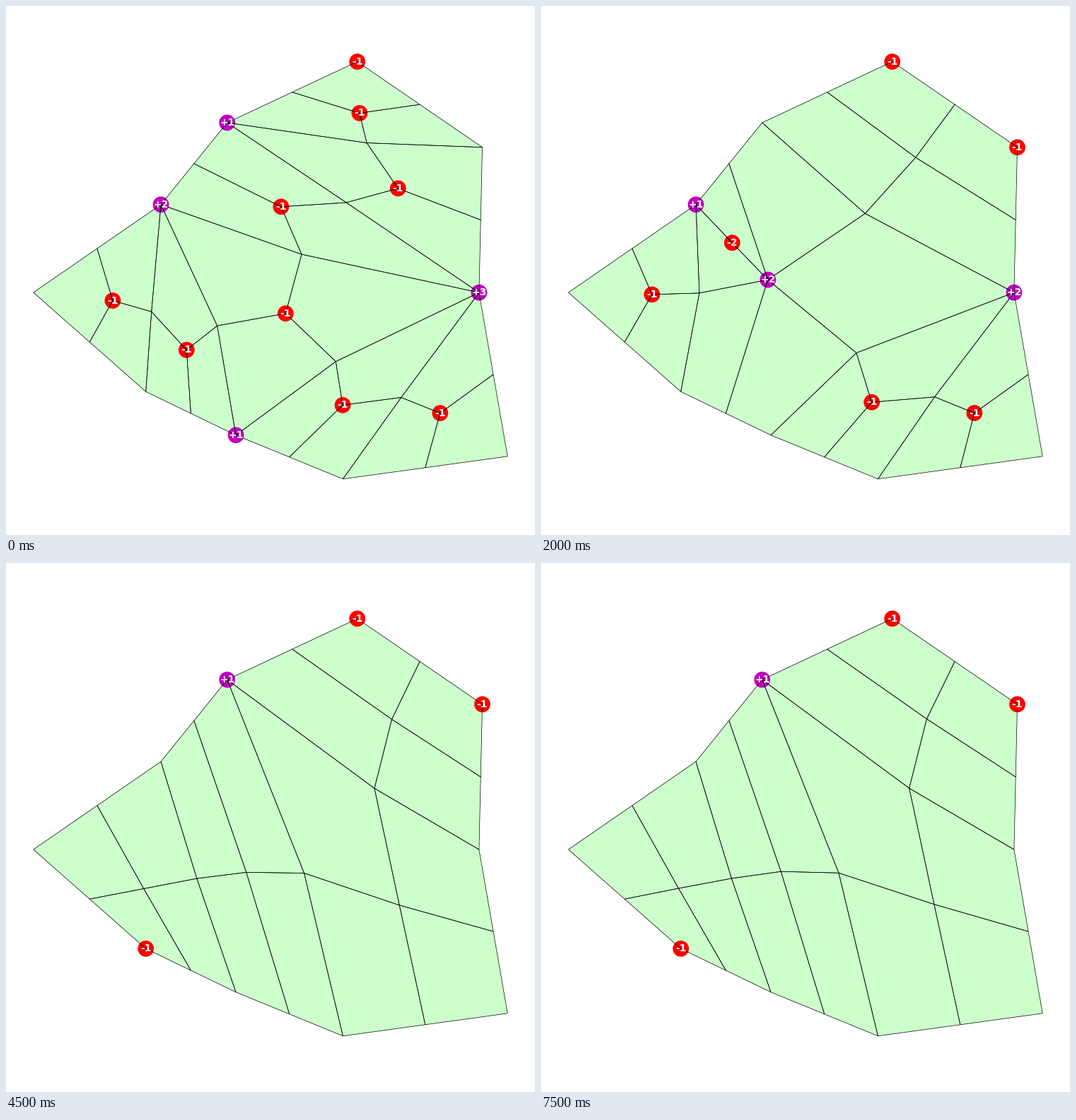
Animation, 748 px wide and 748 px high, one loop 7750 ms. Source, as a matplotlib script:

```python
import numpy as np
import matplotlib.pyplot as plt
from matplotlib.animation import FuncAnimation
from matplotlib.collections import PolyCollection

SIZE, DPI = 748, 100
STEP_MS = 250
SWEEPS = 5
RIM = 20

# Outline corners get the even ids 0..18, the side midpoints the odd ones.
CORNERS = [(496.7, 78.7), (673.5, 199.8), (668.9, 405.2), (709.2, 636.8),
           (476.4, 668.8), (325, 606.8), (197.7, 545.3), (38.8, 405.1),
           (219, 280.8), (312.7, 165)]
TRIANGLES = {"a": (0, 2, 18), "d": (2, 4, 18), "f": (4, 16, 18),
             "h": (4, 10, 16), "k": (10, 12, 16), "m": (12, 14, 16),
             "n": (4, 8, 10), "p": (4, 6, 8)}
SPLITS = {(2, 18): "c", (4, 18): "e", (4, 16): "g", (10, 16): "i",
          (12, 16): "l", (4, 10): "j", (4, 8): "o"}

# Four ids flip an edge (old ends, new ends); two ids merge one vertex into another.
SWING = [("a", 1, 19, 2), (19, 2, "a", 1)]
EDITS = [
    ("c", 2, "a", 3), ("c", "e"), ("d", "a"),
    ("i", 10, "h", 11), ("i", "l"), ("k", "h"),
    ("g", 4, "e", "h"), ("f", "h"), ("g", "l"), ("o", 4, "j", "p"),
    ("n", "p"), ("o", 9), ("l", 12, "m", 11), ("h", 11, "l", 10),
    ("p", 9, "j", 8), ("j", 10, "h", 9), ("j", 4, "e", "p"), ("h", "e", "j", 18),
    ("a", 1, 0, 3), (0, 3, "a", 1),
] + SWING * 5


def side_mid(u, v):
    u, v = sorted((u, v))
    if (u, v) in SPLITS:
        return SPLITS[u, v]
    return 19 if (u, v) == (0, 18) else u + 1


def start_mesh():
    pos = {2 * i: np.array(c, float) for i, c in enumerate(CORNERS)}
    for i in range(0, RIM, 2):
        pos[i + 1] = (pos[i] + pos[(i + 2) % RIM]) / 2
    for (u, v), name in SPLITS.items():
        pos[name] = (pos[u] + pos[v]) / 2
    quads = []
    for name, tri in TRIANGLES.items():
        pos[name] = sum(pos[v] for v in tri) / 3
        for i, v in enumerate(tri):
            after, before = tri[(i + 1) % 3], tri[i - 1]
            quads.append([v, side_mid(v, after), name, side_mid(before, v)])
    return quads, pos


def rotated(ring, first):
    i = ring.index(first)
    return ring[i:] + ring[:i]


def flip(quads, u, v, p, q):
    one, two = [i for i, quad in enumerate(quads) if u in quad and v in quad]
    if rotated(quads[one], u)[1] != v:
        one, two = two, one
    ring = rotated(quads[one], v)[:3] + rotated(quads[two], u)[:3]
    ring = rotated(ring, p)
    assert ring[3] == q
    quads = list(quads)
    quads[one], quads[two] = ring[:4], ring[3:] + ring[:1]
    return quads


def merge(quads, old, new):
    renamed = [[new if v == old else v for v in quad] for quad in quads]
    return [quad for quad in renamed if len(set(quad)) == 4]


def neighbours(quads):
    near = {}
    for quad in quads:
        for u, v in zip(quad, quad[1:] + quad[:1]):
            near.setdefault(u, set()).add(v)
            near.setdefault(v, set()).add(u)
    return near


def smooth(quads, pos):
    near = neighbours(quads)
    for _ in range(SWEEPS):
        moved = {v: sum(pos[w] for w in ws) / len(ws)
                 for v, ws in near.items() if isinstance(v, str)}
        pos = {**pos, **moved}
    return pos


def build_states():
    quads, pos = start_mesh()
    pos = smooth(quads, pos)
    states = [(quads, pos)]
    for edit in EDITS:
        quads = (flip if len(edit) == 4 else merge)(quads, *edit)
        pos = smooth(quads, pos)
        states.append((quads, pos))
    return states


def wanted_degree(v):
    if isinstance(v, str):
        return 4
    return 2 if v in (6, 14) else 3


states = build_states()

fig = plt.figure(figsize=(SIZE / DPI, SIZE / DPI), dpi=DPI, facecolor="white")
ax = fig.add_axes([0, 0, 1, 1])
ax.set_xlim(0, SIZE)
ax.set_ylim(SIZE, 0)
ax.axis("off")

ax.add_patch(plt.Polygon(CORNERS, facecolor="#ccffcc", edgecolor="none", zorder=0))
dots = ax.scatter([], [], s=225, linewidths=1.4, zorder=1)
mesh = PolyCollection([], facecolors="none", edgecolors="black",
                      linewidths=0.5, zorder=2)
ax.add_collection(mesh, autolim=False)
labels = [ax.text(0, 0, "", color="white", fontsize=10, fontweight="bold",
                  family="DejaVu Sans", ha="center", va="center", zorder=3)
          for _ in range(30)]


def draw(frame):
    quads, pos = states[frame]
    mesh.set_verts([[pos[v] for v in quad] for quad in quads])
    excess = {v: len(ws) - wanted_degree(v) for v, ws in neighbours(quads).items()}
    odd = [(pos[v], e) for v, e in excess.items() if e]
    dots.set_offsets([p for p, _ in odd])
    dots.set_color(["red" if e < 0 else (0.75, 0, 0.75) for _, e in odd])
    for label in labels:
        label.set_text("")
    for label, (p, e) in zip(labels, odd):
        label.set_position(p)
        label.set_text(f"{e:+d}")
    return [dots, mesh, *labels]


anim = FuncAnimation(fig, draw, frames=len(states), interval=STEP_MS, repeat=True)
plt.show()
```
